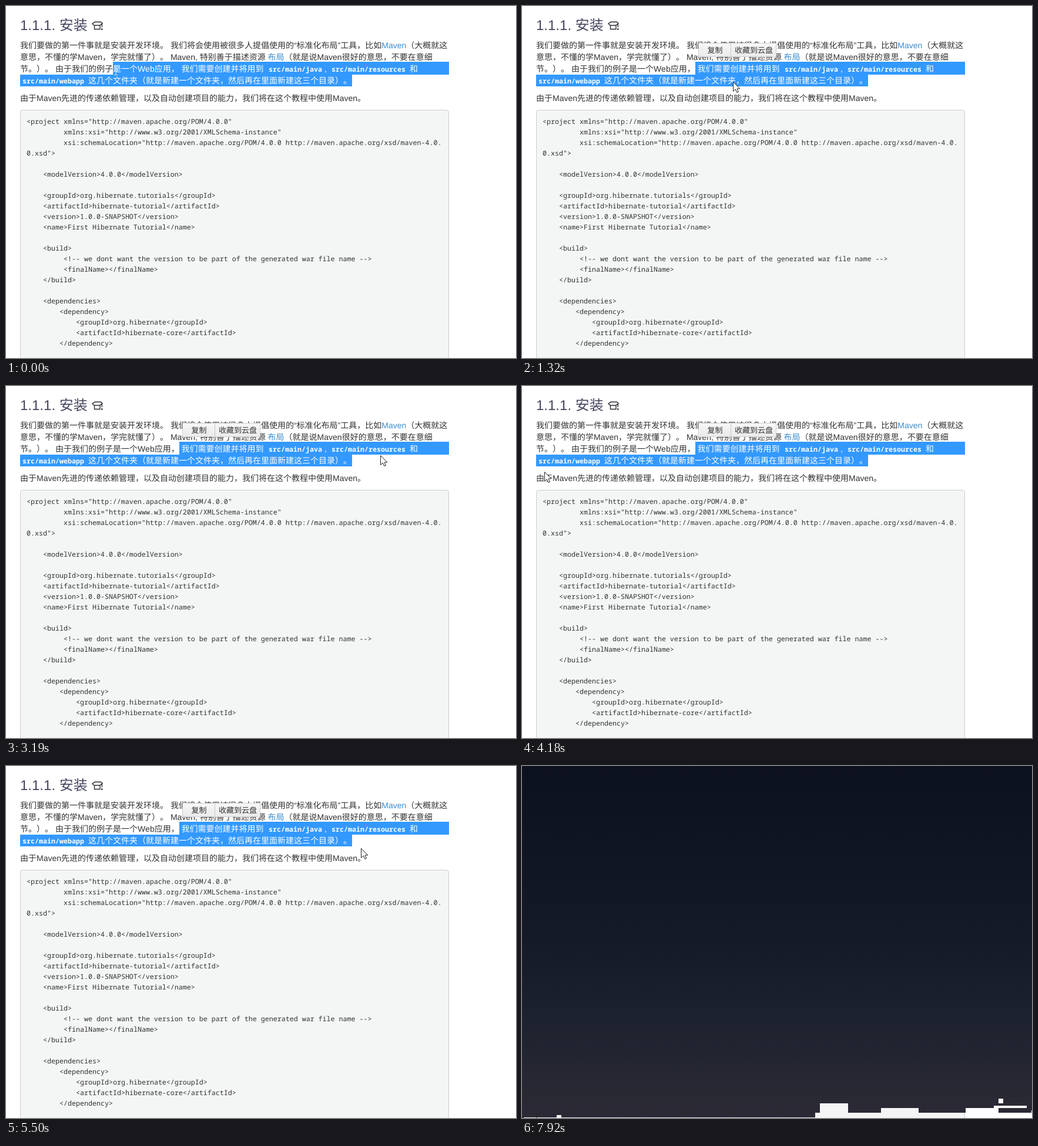
An HTML page that plays this animation: 868x600 px, repeating every 8 s.

```html
<!DOCTYPE html>
<html lang="zh-CN">
<head>
<meta charset="utf-8">
<title>安装</title>
<style>
html, body { margin: 0; width: 100%; height: 100%; overflow: hidden; background: #fff; }
svg { display: block; width: 868px; height: 600px; }
text { white-space: pre; text-rendering: geometricPrecision;
  font-kerning: none; text-spacing-trim: space-all; font-feature-settings: "chws" 0, "halt" 0, "palt" 0;
  font-family: "Liberation Sans", "Noto Sans CJK SC", "Noto Sans CJK", sans-serif; }
.body { font-size: 14px; }
.code { font: 11.667px "Noto Sans Mono", monospace; fill: #333; }
.inline { font: bold 11.667px "Noto Sans Mono", monospace; }
.link { fill: #3a8cd0; }
.menu { font-size: 13px; fill: #333; }
</style>
</head>
<body>
<svg id="stage" viewBox="0 0 868 600" lang="zh-CN">
  <defs>
    <clipPath id="selClip"><rect id="clipTop" y="95" height="22"/><rect x="24" y="117" width="565" height="20"/></clipPath>
    <linearGradient id="night" x2="0" y2="1">
      <stop offset="0" stop-color="#0c111d"/>
      <stop offset=".5" stop-color="#141a26"/>
      <stop offset=".75" stop-color="#1e232f"/>
      <stop offset=".93" stop-color="#292934"/>
      <stop offset="1" stop-color="#2a2935"/>
    </linearGradient>
    <linearGradient id="button" x2="0" y2="1">
      <stop offset="0" stop-color="#f7f7f7"/><stop offset="1" stop-color="#eaeaea"/>
    </linearGradient>
  </defs>
  <rect width="868" height="600" fill="#fff"/>
  <text x="24" y="41" font-size="24" font-weight="300" fill="#46465f">1.1.1. 安装</text>
  <g fill="none" stroke="#2f2a33" stroke-width="1.400">
    <path d="M147 30L151 27.300H161.500L164 29.500L160 33H150Z M150.500 33V39.500H160V33 M163.300 30V36"/>
    <path d="M163.300 38V41" stroke-width="2"/>
  </g>
  <g id="prose"></g>
  <rect x="24.500" y="177.500" width="729" height="460" rx="4" fill="#f4f5f5" stroke="#ccc"/>
  <g id="listing"></g>
  <g fill="#39f"><rect id="selTop" y="95" height="22"/><rect x="24" y="117" width="565" height="20"/></g>
  <g id="picked" clip-path="url(#selClip)"></g>
  <g id="menu">
    <rect x="300.500" y="63.500" width="132" height="23" fill="url(#button)" stroke="#cfcfcf"/>
    <path d="M355.500 64V86" stroke="#c8c8c8"/>
    <text class="menu" x="315.500" y="80">复制</text>
    <text class="menu" x="362" y="80">收藏到云盘</text>
  </g>
  <path id="arrow" d="M.5 .5V16.500L4.300 13L6.800 18.500L9.300 17.500L7 12H11.800Z" fill="#fff" stroke="#222"/>
  <path id="beam" d="M-3 -7.500H-1L0 -6.500L1 -7.500H3M0 -6.500V6.500M-3 7.500H-1L0 6.500L1 7.500H3" fill="none" stroke="#dcecff"/>
  <g id="dark">
    <rect width="868" height="600" fill="url(#night)"/>
    <path d="M499 591H507V575H555V591H611V583H675V591H754V600H499ZM59 595H67V600H59ZM25 599H499V600H25Z" fill="#f5f5f5"/>
    <path d="M754 591H755V583H803V579H859V583H811V591H868V600H754ZM811 567H819V575H811ZM867 587H868V591H867ZM3 599H24V600H3Z" fill="#fff"/>
    <path d="M753.500 591V600" stroke="#ccc"/>
  </g>
</svg>
<script>
const $ = id => document.getElementById(id);
const STEP = 110, LOOP = 8000;

const esc = s => s.replace(/&/g, '&amp;').replace(/</g, '&lt;').replace(/>/g, '&gt;');
const line = (x, y, s, cls = 'body') => `<text class="${cls}" x="${x}" y="${y}">${s}</text>`;
const link = s => `<tspan class="link">${s}</tspan>`;

const selectable =
  line(24, 112, '节。）。 由于我们的例子是一个Web应用， 我们需要创建并将用到') +
  line(447, 112, 'src/main/java', 'inline') + line(542, 112, ',') +
  line(554, 112, 'src/main/resources', 'inline') + line(687, 112, '和') +
  line(28, 132, 'src/main/webapp', 'inline') +
  line(140, 132, '这几个文件夹（就是新建一个文件夹，然后再在里面新建这三个目录）。');

$('prose').setAttribute('fill', '#333');
$('prose').innerHTML =
  line(24, 72, `我们要做的第一件事就是安装开发环境。 我们将会使用被很多人提倡使用的“标准化布局”工具，比如${link('Maven')}（大概就这`) +
  line(24, 92, `意思，不懂的学Maven，学完就懂了）。 Maven, 特别善于描述资源 ${link('布局')}（就是说Maven很好的意思，不要在意细`) +
  selectable +
  line(24, 162, '由于Maven先进的传递依赖管理，以及自动创建项目的能力，我们将在这个教程中使用Maven。');
$('picked').setAttribute('fill', '#fff');
$('picked').innerHTML = selectable;

const listing = `<project xmlns="http://maven.apache.org/POM/4.0.0"
         xmlns:xsi="http://www.w3.org/2001/XMLSchema-instance"
         xsi:schemaLocation="http://maven.apache.org/POM/4.0.0 http://maven.apache.org/xsd/maven-4.0.
0.xsd">

    <modelVersion>4.0.0</modelVersion>

    <groupId>org.hibernate.tutorials</groupId>
    <artifactId>hibernate-tutorial</artifactId>
    <version>1.0.0-SNAPSHOT</version>
    <name>First Hibernate Tutorial</name>

    <build>
         <!-- we dont want the version to be part of the generated war file name -->
         <finalName></finalName>
    </build>

    <dependencies>
        <dependency>
            <groupId>org.hibernate</groupId>
            <artifactId>hibernate-core</artifactId>
        </dependency>`;
$('listing').innerHTML = listing.split('\n').map((s, i) => {
  const body = s.trimStart();
  return line(35 + 7 * (s.length - body.length), 201 + 18 * i, esc(body), 'code');
}).join('');

// pointer path: time, x, y
const path = [
  [0, 187, 110], [660, 298, 104], [770, 298, 104], [1100, 297, 140], [1210, 297, 140],
  [1430, 420, 118], [1650, 297, 116], [1760, 297, 116], [2090, 408, 116], [2200, 408, 116],
  [2310, 534, 108], [2420, 534, 108], [2530, 540, 100], [3300, 653, 121], [3520, 713, 125],
  [4180, 38, 146], [4290, 30, 145], [5060, 448, 140], [5500, 604, 140], [6710, 604, 140],
  [6930, 831, 56], [LOOP, 831, 56]
];
// character edges where the selection may start
const edges = [182, 196, 210, 224, 237, 245, 253, 267, 281, 295];

function pointer(t) {
  const i = path.findIndex(p => p[0] > t);
  const [t0, x0, y0] = path[i - 1], [t1, x1, y1] = path[i];
  const k = (t - t0) / (t1 - t0);
  return [Math.round(x0 + (x1 - x0) * k), Math.round(y0 + (y1 - y0) * k)];
}
const show = (id, on) => $(id).setAttribute('visibility', on ? 'visible' : 'hidden');

function draw(ms) {
  const t = Math.floor(ms / STEP) * STEP;
  const [x, y] = pointer(t);
  const start = edges.filter(e => t >= 660 || e <= x).pop();
  for (const id of ['selTop', 'clipTop']) {
    $(id).setAttribute('x', start);
    $(id).setAttribute('width', 754 - start);
  }
  const beam = t < 880 || (t >= 2310 && t < 2530);
  show('beam', beam);
  show('arrow', !beam && t < 7040);
  $(beam ? 'beam' : 'arrow').setAttribute('transform', `translate(${x} ${y})`);
  show('menu', t >= 880);
  show('dark', t >= 7920);
}

function tick() {
  draw(performance.now() % LOOP);
  requestAnimationFrame(tick);
}
tick();
</script>
</body>
</html>
```
